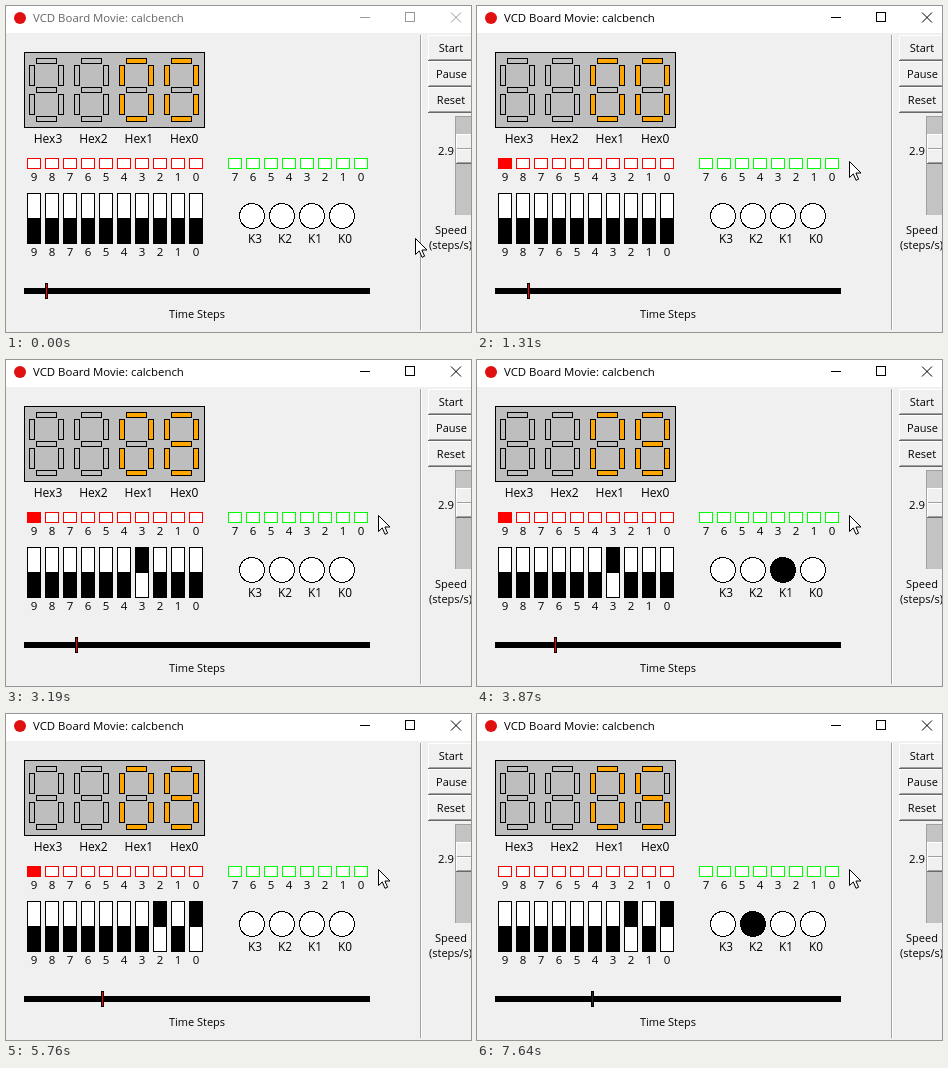
An HTML page for the animation above (8 s loop, 465x326 px).

```html
<!DOCTYPE html>
<html lang="en">
<head>
<meta charset="utf-8">
<title>VCD Board Movie</title>
<style>
  html, body { margin: 0; width: 100%; height: 100%; overflow: hidden; background: #f0f0f0; }
  svg { display: block; }
  text { font: 11px "Open Sans", "Noto Sans", sans-serif; fill: #000; }
  .crisp { shape-rendering: crispEdges; }
</style>
</head>
<body>
<svg id="stage" width="465" height="326" viewBox="0 0 465 326"></svg>
<script>
const LOOP = 8000;
const stage = document.getElementById('stage');

function add(tag, attrs) {
  const node = document.createElementNS('http://www.w3.org/2000/svg', tag);
  for (const name in attrs) node.setAttribute(name, attrs[name]);
  stage.appendChild(node);
  return node;
}
const fill = (x, y, width, height, color) =>
  add('rect', { x, y, width, height, fill: color, class: 'crisp' });
// Outlined box whose one pixel border lies on x..x+w and y..y+h.
const box = (x, y, width, height, color, stroke = '#000') =>
  add('rect', { x: x + .5, y: y + .5, width, height, fill: color, stroke, class: 'crisp' });
const line = (d, stroke, extra = {}) => add('path', { d, stroke, fill: 'none', ...extra });
function label(str, x, y, size = 11, anchor = 'middle') {
  const node = add('text', { x, y, 'text-anchor': anchor, style: `font-size:${size}px` });
  node.textContent = str;
  return node;
}
function raised(x, y, w, h) {
  fill(x, y, w, h, '#696969');
  fill(x, y, w - 1, h - 1, '#fff');
  fill(x + 1, y + 1, w - 2, h - 2, '#a0a0a0');
  fill(x + 1, y + 1, w - 3, h - 3, '#f0f0f0');
}

// Window frame
fill(0, 0, 465, 326, '#f0f0f0');
fill(0, 0, 465, 27, '#fff');
add('circle', { cx: 14, cy: 12, r: 6, fill: '#e01010' });
const title = label('VCD Board Movie: calcbench', 27, 16, 11.4, 'start');
const controls = [
  line('M354 11.5h10', '#000', { class: 'crisp' }),
  line('M399.5 6.5h9v9h-9z', '#000', { class: 'crisp' }),
  line('M445 6.5l10 10m0 -10l-10 10', '#000')
];

// Hex displays, segments in the order a to g
const SEGMENTS = [[7, 0, 1], [29, 7], [29, 36], [7, 58, 1], [0, 36], [0, 7], [7, 29, 1]];
const GLYPHS = { 0: 'abcdef', 5: 'acdfg', 8: 'abcdefg' };
box(18, 46, 180, 75, '#bebebe');
const displays = [3, 2, 1, 0].map((n, i) => {
  label('Hex' + n, 42 + 45.4 * i, 137, 12);
  return SEGMENTS.map(([dx, dy, flat]) =>
    box(23 + 45 * i + dx, 52 + dy, flat ? 20 : 5, flat ? 5 : 20, '#bebebe'));
});
function showDigit(display, digit) {
  const lit = GLYPHS[digit] || '';
  displays[display].forEach((seg, i) =>
    seg.setAttribute('fill', lit.includes('abcdefg'[i]) ? '#ffa500' : '#bebebe'));
}

// Lamps and switches
const redLamps = [], switches = [];
for (let n = 9; n >= 0; n--) {
  const x = 21 + 18 * (9 - n);
  redLamps[n] = box(x, 152, 13, 10, '#fff', '#f00');
  label(n, x + 7, 175, 11.5);
  box(x, 187, 13, 50, '#fff');
  switches[n] = fill(x + 1, 212, 12, 25, '#000');
  label(n, x + 7, 250, 11.5);
}
for (let n = 7; n >= 0; n--) {
  const x = 222 + 18 * (7 - n);
  box(x, 152, 13, 10, '#fff', '#0f0');
  label(n, x + 7, 175, 11.5);
}
const keys = [0, 1, 2, 3].map(n => {
  label('K' + n, 339 - 30 * n, 237, 11.8);
  return add('circle', { cx: 336 - 30 * n, cy: 210, r: 12.5, stroke: '#000', class: 'crisp' });
});

// Time bar
fill(18, 282, 346, 6, '#000');
label('Time Steps', 191, 312);
const marker = fill(0, 277, 3, 16, '#000');
const markerCore = fill(0, 278, 1, 14, '#f00');

// Side panel
fill(414, 29, 1, 295, '#a0a0a0');
fill(415, 29, 1, 295, '#fff');
raised(422, 29, 48, 26);
const pressed = line('M422.5 54V29.5H465M423.5 53V30.5H465', '#696969', { class: 'crisp' });
const startText = label('Start', 445, 46);
raised(422, 55, 48, 26);
label('Pause', 445.5, 72);
raised(422, 81, 48, 26);
label('Reset', 445, 98);
fill(449, 110, 16, 99, '#c3c3c3');
line('M449.5 209V110.5H465', '#a0a0a0', { class: 'crisp' });
raised(450, 128, 24, 30);
fill(451, 142, 14, 1, '#a0a0a0');
fill(451, 143, 14, 1, '#fff');
label('2.9', 440, 149, 11.3);
label('Speed', 445, 228);
label('(steps/s)', 423, 243, 11, 'start');

const cursor = add('path', {
  d: 'M.5 .5V16.5L4.3 12.9 7 19.3 9.6 18.2 6.9 12H12z',
  fill: '#fff', stroke: '#000'
});

// Simulation state
const STEP_TIMES = [0, 610, 930, 1310, 1690, 2090, 2390, 2790, 3190, 3570, 3870,
  4300, 4680, 5060, 5380, 5760, 6140, 6540, 6860, 7260, 7640];
const LAMP = '010110101010101101010';
const PRESSES = [[5, 6, 0], [9, 10, 1], [16, 17, 0], [20, 20, 2]];
const DARK_STEPS = [6, 12, 20];
const POINTER = [[0, 409, 232], [70, 412, 214], [140, 424, 150], [210, 437, 78], [290, 442, 41],
  [610, 438, 55], [690, 404, 106], [760, 372, 155]];

function draw(t) {
  const step = STEP_TIMES.filter(s => s <= t).length - 1;
  const focused = t >= 460;
  title.style.fill = focused ? '#000' : '#666';
  controls.forEach(c => c.setAttribute('stroke', focused ? '#000' : '#999'));

  const down = t >= 460 && t < 530;
  pressed.setAttribute('visibility', down ? 'visible' : 'hidden');
  startText.setAttribute('transform', down ? 'translate(1 1)' : '');

  showDigit(2, 0);
  showDigit(3, step < 6 ? 0 : step < 17 ? 8 : 5);
  redLamps[9].setAttribute('fill', LAMP[step] === '1' ? '#f00' : '#fff');

  const on = step < 4 ? [] : step < 15 ? [3] : [2, 0];
  switches.forEach((s, n) => s.setAttribute('y', on.includes(n) ? 188 : 212));
  keys.forEach((k, n) => {
    const held = PRESSES.some(([from, to, key]) => key === n && step >= from && step <= to);
    k.setAttribute('fill', held ? '#000' : '#fff');
  });

  const left = Math.floor(39.5 + 3.75 * step);
  marker.setAttribute('x', left);
  markerCore.setAttribute('x', left + 1);
  markerCore.setAttribute('fill', DARK_STEPS.includes(step) ? '#222' : '#f00');

  const [, x, y] = POINTER.filter(p => p[0] <= t).pop();
  cursor.setAttribute('transform', `translate(${x} ${y})`);
}

const begin = performance.now();
function tick() {
  draw((performance.now() - begin) % LOOP);
  requestAnimationFrame(tick);
}
tick();
</script>
</body>
</html>
```
